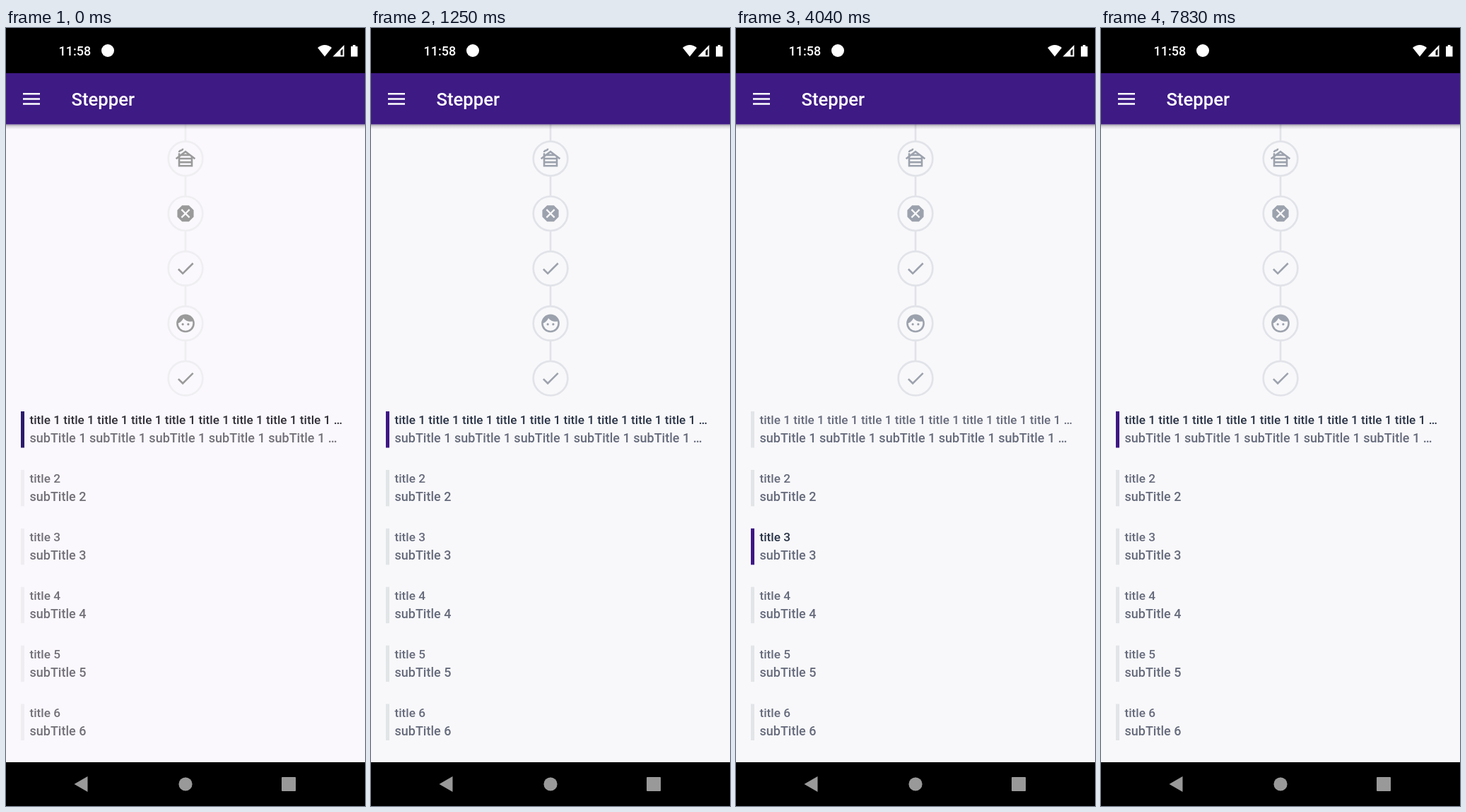
An HTML page for the animation above (7960 ms loop, 508x1102 px).

```html
<!DOCTYPE html>
<html lang="en">
<head>
<meta charset="utf-8">
<title>Stepper</title>
<style>
  html, body { margin: 0; width: 100%; height: 100%; overflow: hidden; background: #000; }
  svg { display: block; }
  text { font-family: Roboto, sans-serif; font-weight: 500; white-space: pre; }
  .bg { fill: var(--bg); }
  .ring { fill: none; stroke: var(--line); stroke-width: 2.7; }
  .icon { fill: var(--icon); fill-rule: evenodd; }
  .bar { fill: var(--bar); }
  .title, .sub { fill: var(--text); }
  .title { font-size: 17.2px; }
  .sub { font-size: 18px; }
  .active .bar { fill: var(--accent); }
  .active .title { fill: var(--strong); }
</style>
</head>
<body>
<svg width="508" height="1102" viewBox="0 0 508 1102">
  <defs>
    <linearGradient id="shadow" x2="0" y2="1">
      <stop stop-color="#30283c" stop-opacity=".45"/>
      <stop offset=".4" stop-color="#30283c" stop-opacity=".16"/>
      <stop offset="1" stop-color="#30283c" stop-opacity="0"/>
    </linearGradient>
  </defs>
  <rect width="508" height="1102"/>
  <rect class="bg" y="136" width="508" height="904"/>
  <g id="steps"></g>
  <g id="rows"></g>
  <rect y="136.5" width="508" height="7" fill="url(#shadow)"/>
  <rect y="64" width="508" height="72.5" fill="#3e1a85"/>
  <g fill="#fff">
    <text x="74.5" y="39" font-size="18">11:58</text>
    <circle cx="144" cy="32" r="9"/>
    <path d="M441 28Q451 20 461 28L451 40.5Z"/>
    <path d="M462.5 40.5L478.5 24V40.5ZM473.5 32.5V38.5H476.5V29.5Z" fill-rule="evenodd"/>
    <path d="M488 26h2.7v-2h3.8v2H497.5v14.5H488Z"/>
    <path d="M24 92h24v2.6H24zM24 99.2h24v2.6H24zM24 106.2h24v2.6H24z"/>
    <text x="92.5" y="110" font-size="25.7">Stepper</text>
  </g>
  <g fill="#999">
    <path d="M96.5 1071L115.500 1060V1082Z"/>
    <circle cx="254" cy="1071" r="9.6"/>
    <rect x="390" y="1061" width="20" height="20" rx="1"/>
  </g>
</svg>
<script>
const LOOP = 7960, SETTLE = 370;

const cabin = 'M10 1c0 1.66-1.34 3-3 3-.55 0-1 .45-1 1H4c0-1.66 1.34-3 3-3 .55 0 1-.45 1-1zM12 3L6 7.58V6H4v3.11L1 11.4l1.210 1.590L4 11.620V21h16v-9.380l1.790 1.360L23 11.4zM13.940 7h-3.890L12 5.520zM7.440 9h9.120L18 10.1V11H6v-.9zM18 13v2H6v-2zM6 19v-2h12v2z';
const danger = 'M15.73 3H8.27L3 8.27v7.46L8.27 21h7.46L21 15.73V8.27zM17 15.74L15.74 17 12 13.26 8.26 17 7 15.74 10.74 12 7 8.26 8.26 7 12 10.74 15.74 7 17 8.26 13.26 12z';
const check = 'M9 16.17L4.83 12l-1.42 1.41L9 19 21 7l-1.41-1.41z';
const face = 'M10.25 13a1.25 1.25 0 1 1-2.5 0 1.25 1.25 0 0 1 2.5 0zM16.25 13a1.25 1.25 0 1 1-2.5 0 1.25 1.25 0 0 1 2.5 0zM22 12a10 10 0 1 1-20 0 10 10 0 0 1 20 0zM20 12c0-.78-.12-1.53-.33-2.24-.7.15-1.42.24-2.17.24-3.13 0-5.92-1.44-7.76-3.69C8.69 8.87 6.6 10.88 4 11.86V12a8 8 0 0 0 16 0z';

const step = (path, i) => {
  const y = 185 + i * 77.8;
  return `<path class="ring" d="M254 ${y - 53}V${y - 25}"/>
    <circle class="ring" cx="254" cy="${y}" r="24.3"/>
    <path class="icon" d="${path}" transform="translate(254 ${y}) scale(1.286) translate(-12 -12)"/>`;
};

const row = n => {
  const label = word => n === 1 ? `${word} 1 `.repeat(word === 'title' ? 9 : 5) + '…' : `${word} ${n}`;
  return `<g transform="translate(0 ${(n - 1) * 82.9})">
    <rect class="bar" x="21" y="543" width="5" height="51.5"/>
    <text class="title" x="33.5" y="561">${label('title')}</text>
    <text class="sub" x="33.5" y="587">${label('subTitle')}</text></g>`;
};

const rows = document.getElementById('rows');
document.getElementById('steps').innerHTML = [cabin, danger, check, face, check].map(step).join('');
rows.innerHTML = [1, 2, 3, 4, 5, 6].map(row).join('');

// Each colour settles from its first to its second value as the loop starts.
const palette = {
  bg: ['#faf8fd', '#f8f8fa'],
  line: ['#efeef1', '#e1e3e9'],
  icon: ['#9a9a9b', '#9ca2ad'],
  bar: ['#efedf1', '#e1e5e8'],
  text: ['#737178', '#666b7c'],
  strong: ['#302e36', '#293346'],
  accent: ['#2c1a6b', '#3f1785']
};
const channels = hex => [1, 3, 5].map(i => parseInt(hex.slice(i, i + 2), 16));
const mix = (from, to, k) => {
  const end = channels(to);
  return `rgb(${channels(from).map((v, i) => Math.round(v + (end[i] - v) * k))})`;
};

const selectedRow = t => t >= 3400 && t < 4500 ? 3 : 1;

function draw() {
  const t = performance.now() % LOOP;
  const k = Math.min(1, t / SETTLE);
  for (const [name, [from, to]] of Object.entries(palette))
    document.documentElement.style.setProperty('--' + name, mix(from, to, k));
  [...rows.children].forEach((el, i) => el.classList.toggle('active', i + 1 === selectedRow(t)));
  requestAnimationFrame(draw);
}
draw();
</script>
</body>
</html>
```
